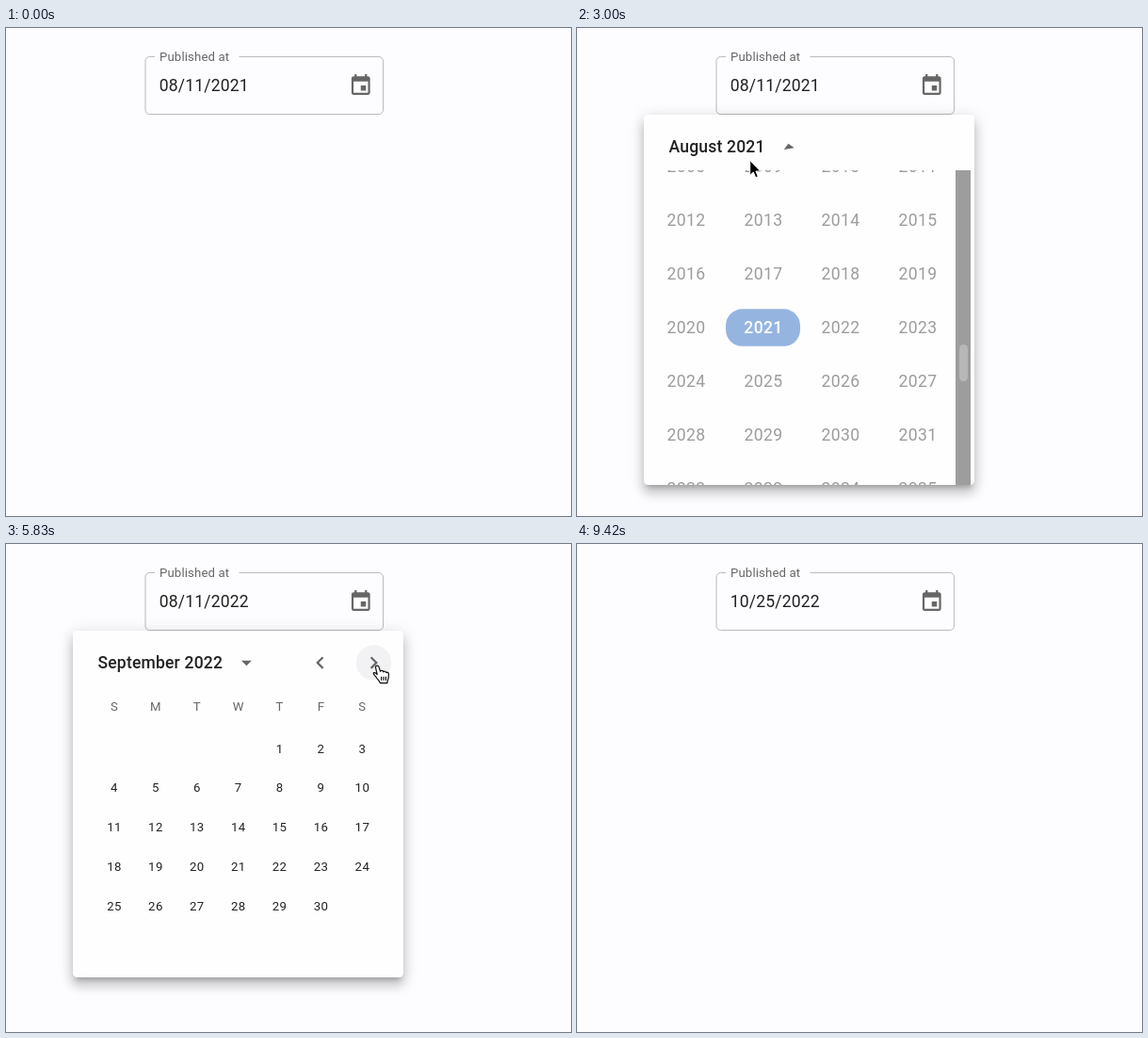
An HTML page that plays this animation: 600x518 px, repeating every 9.76 s.

```html
<!DOCTYPE html>
<html lang="en">
<head>
<meta charset="utf-8">
<title>Date picker</title>
<style>
  html, body { margin: 0; width: 100%; height: 100%; overflow: hidden; background: #fdfcff; }
  svg { position: absolute; left: 0; top: 0; display: block; }
  text { font: 13.2px Roboto, Arial, sans-serif; fill: #222; }
  .muted { fill: #666; }
  .large { font-size: 17.55px; letter-spacing: .18px; }
  .medium { font-weight: 500; }
  .mid { text-anchor: middle; letter-spacing: .4px; }
  .on { fill: #fff; font-weight: 500; }
  .blue { fill: #1259bb; }
  .hover { fill: #f2f2f4; }
  #popup {
    position: absolute; left: 71px; top: 92px; width: 351px; overflow: hidden;
    background: #fefefe; border-radius: 4.4px; transform-origin: top center;
    box-shadow: 0 5.5px 5.5px -3.3px rgba(0,0,0,.2), 0 8.8px 11px 1.1px rgba(0,0,0,.14), 0 3.3px 15px 2.2px rgba(0,0,0,.12);
  }
</style>
</head>
<body>
<svg width="600" height="518">
  <circle id="iconHover" class="hover" cx="376.5" cy="61" r="22"/>
  <path id="border" fill="none" d="M158 30.5H152.5a4.5 4.5 0 0 0-4.5 4.5V87a4.5 4.5 0 0 0 4.5 4.5H396a4.5 4.5 0 0 0 4.5-4.5V35a4.5 4.5 0 0 0-4.5-4.5H247.5"/>
  <text class="muted" x="163" y="34.6" letter-spacing=".13">Published at</text>
  <text id="value" class="large" x="162.7" y="67.2"></text>
  <path class="muted" transform="translate(363.6 47.9) scale(1.097)" d="M17 12h-5v5h5v-5zM16 1v2H8V1H6v2H5c-1.11 0-1.99.9-1.99 2L3 19c0 1.1.89 2 2 2h14c1.1 0 2-.9 2-2V5c0-1.1-.9-2-2-2h-1V1h-2zm3 18H5V8h14v11z"/>
</svg>

<div id="popup">
  <svg width="351" height="393" viewBox="71 92 351 393">
    <clipPath id="list"><rect x="71" y="151" width="351" height="334"/></clipPath>
    <circle id="nextHover" class="hover" cx="390.5" cy="126" r="18.7"/>
    <text id="label" class="large medium" x="97.5" y="132.2"></text>
    <path id="drop" class="muted" d="M-5.5-2.2L0 3.3 5.5-2.2z"/>
    <g id="arrows" class="muted">
      <path transform="translate(320.4 112.9) scale(1.097)" d="M15.41 7.41L14 6l-6 6 6 6 1.41-1.41L10.83 12z"/>
      <path transform="translate(377.4 112.9) scale(1.097)" d="M10 6L8.59 7.41 13.17 12l-4.58 4.59L10 18l6-6z"/>
    </g>
    <g id="days">
      <g id="week"></g>
      <circle id="dayHover" class="hover" cx="202.6" cy="384" r="19.8"/>
    </g>
    <g id="years" clip-path="url(#list)">
      <rect id="yearHover" class="hover" x="240" y="298.3" width="79" height="39.5" rx="17.5"/>
      <rect class="blue" x="158" y="298.3" width="79" height="39.5" rx="17.5"/>
      <rect x="402" y="151" width="16" height="334" fill="#232324"/>
      <rect x="406" y="336" width="9" height="39" rx="4.5" fill="#5f5f60"/>
    </g>
    <g id="scroll">
      <rect x="406" y="92" width="16" height="393" fill="#232324"/>
      <rect x="410.5" y="95" width="9" height="215" rx="4.5" fill="#5f5f60"/>
    </g>
  </svg>
</div>

<svg id="cursor" width="600" height="518">
  <g id="pointer">
    <path id="arrow" d="M0 0V16L3.6 12.6 6 18.3 8.6 17.2 6.2 11.6H11Z" stroke="#fff"/>
    <g id="hand" stroke="#111" stroke-width="1.2" stroke-linejoin="round">
      <path fill="#fff" d="M-1.6 1.7C-1.2-.4 1.5-.5 2 1.3L3.4 6.2C4 5 6.4 5.2 6.8 6.8 7.4 5.8 9.4 6 9.8 7.6 10.6 6.8 12.4 7.4 12.4 9L12.2 12.6C12 14.4 11 15.6 10.8 18.6H3.4C3 16.6 0 14-1 12.2-2 10.8-3.8 9.4-3.8 8.2-3.6 7-1.6 7.4.2 9.6Z"/>
      <path fill="none" d="M4.6 11.8v4M7 11.8v4M9.4 11.8v4"/>
    </g>
    <path id="beam" fill="none" stroke="#111" d="M-3-8Q0-8 0-6 0-8 3-8M0-6V6M-3 8Q0 8 0 6 0 8 3 8"/>
  </g>
</svg>

<script>
const LOOP = 9760, FRAME = 1000 / 12;
const $ = id => document.getElementById(id);
const colX = c => 115 + 43.9 * c;

function add(parent, tag, attrs, content = '') {
  const el = document.createElementNS('http://www.w3.org/2000/svg', tag);
  for (const k in attrs) el.setAttribute(k, attrs[k]);
  el.textContent = content;
  return parent.appendChild(el);
}

[...'SMTWTFS'].forEach((d, c) =>
  add($('week'), 'text', { class: 'mid muted', x: colX(c), y: 177.2 }, d));

for (let i = 0; i < 28; i++) {
  const year = 2008 + i;
  add($('years'), 'text', {
    class: 'large mid' + (year === 2021 ? ' on' : ''),
    x: 116 + 82 * (i % 4), y: 324.2 + 57 * (Math.floor(i / 4) - 3)
  }, year);
}

function monthGrid(year, month, chosen) {
  const g = add($('days'), 'g', {});
  const first = new Date(year, month, 1).getDay();
  const count = new Date(year, month + 1, 0).getDate();
  for (let d = 1; d <= count; d++) {
    const i = first + d - 1, x = colX(i % 7), y = 217 + 41.75 * Math.floor(i / 7);
    if (d === chosen) add(g, 'circle', { class: 'blue', cx: x - .3, cy: y, r: 19.8 });
    else if (month === 9 && d === 26)
      add(g, 'circle', { fill: 'none', stroke: '#666', cx: x - .3, cy: y, r: 19.3 });
    add(g, 'text', { class: 'mid' + (d === chosen ? ' on' : ''), x, y: y + 4.5 }, d);
  }
  return g;
}

// Each view: start time, header text, grid, whether it slides in
const views = [
  [0, 'August 2021', monthGrid(2021, 7, 11), false],
  [3900, 'August 2022', monthGrid(2022, 7, 11), false],
  [5400, 'September 2022', monthGrid(2022, 8), true],
  [6590, 'October 2022', monthGrid(2022, 9), true],
  [8160, 'October 2022', monthGrid(2022, 9, 25), false]
];

// Pointer path: time, x, y
const path = [
  [333, 18, 220], [1083, 378, 67], [1667, 378, 67], [2333, 177, 141.5], [2417, 177, 138],
  [2583, 180, 134.5], [2917, 180, 134.5], [3667, 289, 309], [4083, 289, 309], [4750, 378, 199],
  [5167, 394, 129], [6750, 394, 129], [7167, 239, 242], [7583, 197, 369], [7833, 201, 380],
  [8750, 201, 380], [9333, 551, 422]
];
const handTimes = [[990, 1740], [2160, 3000], [3400, 4900], [5080, 6800], [7400, 8450]];

const within = (t, a, b) => t >= a && t < b;
const ramp = (t, start, length) => Math.min(1, Math.max(0, (t - start) / length));
const smooth = p => p * p * (3 - 2 * p);
const easeOut = p => 1 - (1 - p) ** 2.6;
const show = (id, on) => { $(id).style.display = on ? '' : 'none'; };

function drawPointer(t) {
  show('cursor', within(t, 330, 9400));
  let i = 0;
  while (i < path.length - 2 && t >= path[i + 1][0]) i++;
  const [t0, x0, y0] = path[i], [t1, x1, y1] = path[i + 1];
  const p = smooth(ramp(t, t0, t1 - t0));
  $('pointer').setAttribute('transform', `translate(${x0 + (x1 - x0) * p} ${y0 + (y1 - y0) * p})`);
  const hand = handTimes.some(([a, b]) => within(t, a, b));
  const beam = within(t, 900, 990);
  show('hand', hand);
  show('beam', beam);
  show('arrow', !hand && !beam);
}

function drawField(t) {
  const hovered = within(t, 900, 1490);
  $('border').setAttribute('stroke', hovered ? '#222' : '#bbbbbe');
  $('border').setAttribute('stroke-width', hovered ? 1.2 : 1);
  show('iconHover', within(t, 990, 1570));
  $('value').textContent = t < 3990 ? '08/11/2021' : t < 8240 ? '08/11/2022' : '10/25/2022';
}

function drawPopup(t) {
  const open = easeOut(ramp(t, 1480, 300)) * (1 - smooth(ramp(t, 8170, 250)));
  const popup = $('popup').style;
  popup.display = open > 0 ? '' : 'none';
  popup.opacity = open;
  popup.transform = `scale(${.75 + .25 * open}, ${.5625 + .4375 * open})`;
  popup.height = (within(t, 2740, 3990) ? 393 : 367.5) + 'px';

  const back = ramp(t, 3990, 250);
  $('days').style.opacity = $('arrows').style.opacity = t < 2740 ? 1 : back;
  $('years').style.opacity = t < 3900 ? ramp(t, 2890, 250) : 0;
  show('scroll', within(t, 2740, 2900) || within(t, 3900, 3990));
  show('yearHover', within(t, 3500, 3900));
  show('dayHover', within(t, 7490, 8160));
  show('nextHover', within(t, 5320, 6800));

  const now = views.findLastIndex(v => t >= v[0]);
  const [start, title, , slides] = views[now];
  const moved = slides ? easeOut(ramp(t, start, 350)) : 1;
  views.forEach(([, , grid], i) => {
    const leaving = i === now - 1 && moved < 1;
    grid.style.display = i === now || leaving ? '' : 'none';
    grid.setAttribute('transform', `translate(${351 * (leaving ? -moved : 1 - moved)} 0)`);
  });

  const label = $('label');
  label.textContent = title;
  label.style.opacity = slides ? ramp(t, start, 250) : now === 1 ? back : 1;
  const turn = 180 * (smooth(ramp(t, 2740, 300)) - smooth(ramp(t, 3920, 300)));
  const end = 97.5 + label.getComputedTextLength();
  $('drop').setAttribute('transform', `translate(${end + 25.3} 126) rotate(${turn})`);
}

function draw() {
  // Motion runs at twelve pictures a second
  const t = Math.floor((performance.now() % LOOP + 4) / FRAME) * FRAME;
  drawField(t);
  drawPopup(t);
  drawPointer(t);
  requestAnimationFrame(draw);
}
draw();
</script>
</body>
</html>
```
